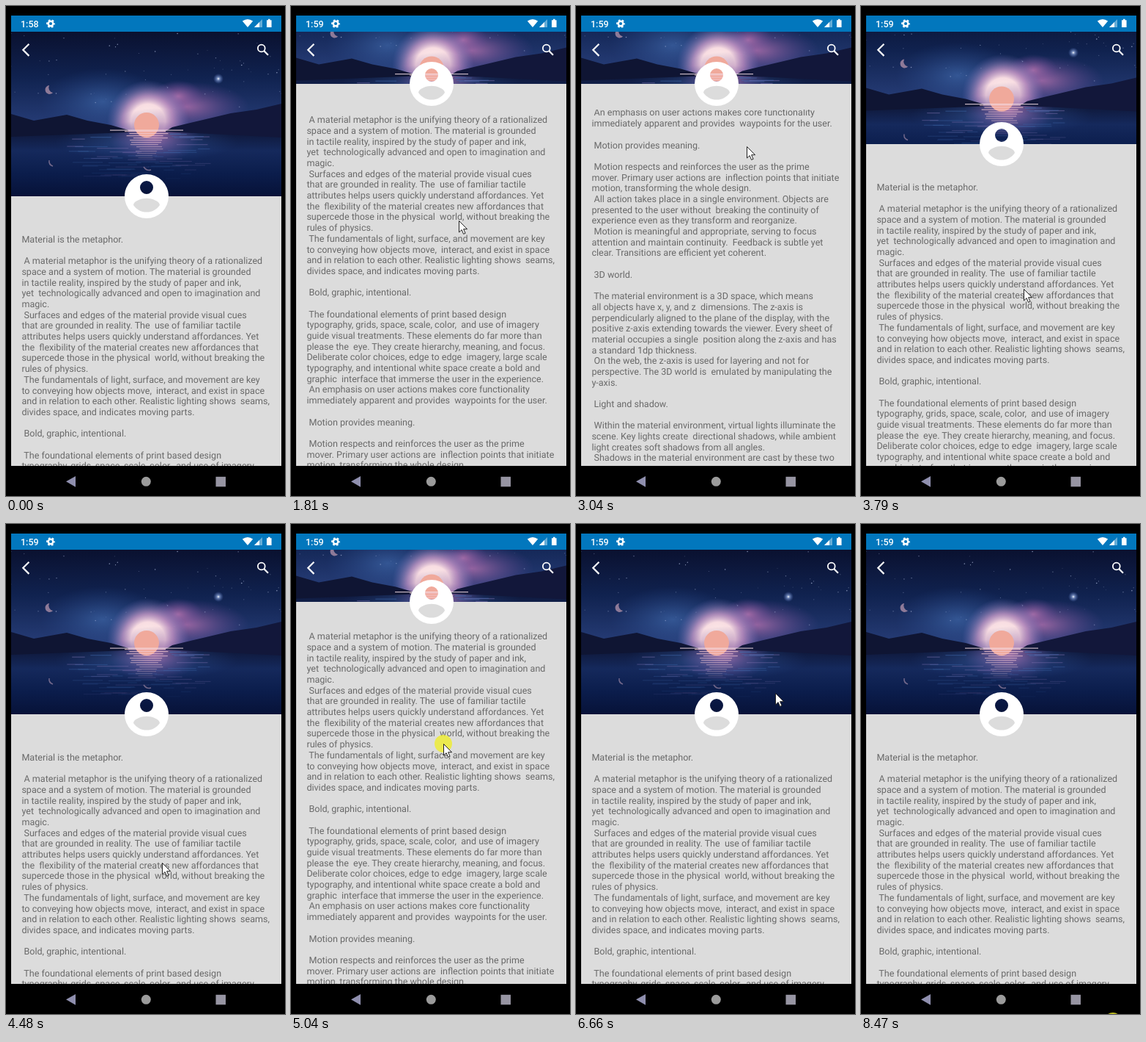
An HTML page that plays this animation: 381x667 px, repeating every 8540 ms.

```html
<!DOCTYPE html>
<html lang="en">
<head>
<meta charset="utf-8">
<title>Collapsing header</title>
<style>
html, body { margin: 0; width: 100%; height: 100%; overflow: hidden; background: #000; }
#stage { position: relative; width: 381px; height: 667px; overflow: hidden; background: #000; }
#stage > * { position: absolute; }
#page { left: 7px; top: 35px; width: 369px; height: 591px; background: #dcdcdc; }
#header { left: 7px; top: 35px; width: 369px; height: 224px; overflow: hidden; }
#scene { display: block; }
#clip { left: 7px; width: 369px; overflow: hidden; }
#copy {
  position: absolute; left: 14.4px; margin: 0; white-space: pre;
  font: 12.557px/14.69px Roboto, sans-serif; color: #696969;
  text-rendering: geometricPrecision;
}
#avatar { left: 155.5px; top: 223px; }
#chrome { left: 0; top: 0; }
#chrome text { font: 500 12.5px Roboto, sans-serif; }
#pointer { left: 0; top: 0; overflow: visible; }
</style>
</head>
<body>
<div id="stage">
  <div id="page"></div>
  <div id="header">
    <svg id="scene" width="369" height="224">
      <defs>
        <linearGradient id="sky" x2="0" y2="1">
          <stop offset="0" stop-color="#0a1130"/>
          <stop offset=".45" stop-color="#10224f"/>
          <stop offset="1" stop-color="#29407c"/>
        </linearGradient>
        <linearGradient id="sea" x2="0" y2="1">
          <stop offset="0" stop-color="#0e1738"/>
          <stop offset=".3" stop-color="#15295c"/>
          <stop offset=".65" stop-color="#0b1d4c"/>
          <stop offset="1" stop-color="#071238"/>
        </linearGradient>
        <radialGradient id="glow">
          <stop offset="0" stop-color="#fff3ec"/>
          <stop offset=".42" stop-color="#f8dde2"/>
          <stop offset=".62" stop-color="#cfa0cc" stop-opacity=".75"/>
          <stop offset="1" stop-color="#6a6cb4" stop-opacity="0"/>
        </radialGradient>
        <radialGradient id="cloud">
          <stop offset="0" stop-color="#b673ae" stop-opacity=".8"/>
          <stop offset="1" stop-color="#6a4a98" stop-opacity="0"/>
        </radialGradient>
        <radialGradient id="haze">
          <stop offset="0" stop-color="#4470b4" stop-opacity=".6"/>
          <stop offset="1" stop-color="#2a4c90" stop-opacity="0"/>
        </radialGradient>
        <radialGradient id="spark">
          <stop offset="0" stop-color="#fff"/>
          <stop offset=".3" stop-color="#a9c2f5" stop-opacity=".6"/>
          <stop offset="1" stop-color="#5f80d0" stop-opacity="0"/>
        </radialGradient>
      </defs>
      <rect width="369" height="136" fill="url(#sky)"/>
      <ellipse cx="125" cy="95" rx="85" ry="45" fill="url(#haze)"/>
      <ellipse cx="240" cy="102" rx="85" ry="34" fill="url(#cloud)"/>
      <ellipse cx="228" cy="88" rx="34" ry="22" fill="url(#cloud)"/>
      <g id="stars" fill="#c9d4f5"></g>
      <circle cx="283" cy="64" r="7" fill="url(#spark)"/>
      <path d="M178 20a8 8 0 0 0 15 10a9 9 0 0 1-15-10z" fill="#dcb9ac"/>
      <path d="M52 73a6 6 0 1 0 5 10a7 7 0 0 1-5-10z" fill="#8e7a98"/>
      <circle cx="187" cy="122" r="56" fill="url(#glow)"/>
      <rect y="135" width="369" height="89" fill="url(#sea)"/>
      <ellipse cx="185" cy="150" rx="125" ry="28" fill="url(#haze)"/>
      <ellipse cx="195" cy="142" rx="62" ry="38" fill="url(#cloud)"/>
      <circle cx="185" cy="127" r="17" fill="#f0a99b"/>
      <path d="M0 112L31 121 76 113 104 121 136 127 160 134 160 137 0 143z" fill="#0f1533"/>
      <path d="M210 136L220 130 262 120 300 111 335 106 369 98V144z" fill="#12173a"/>
      <g id="ripples"></g>
      <g fill="none" stroke="#a58ca8" stroke-opacity=".65" stroke-width="1.5">
        <path d="M52 175q-1 6 5 8M181 184q4 6 10 4"/>
      </g>
    </svg>
  </div>
  <div id="clip"><pre id="copy">Material is the metaphor.

 A material metaphor is the unifying theory of a rationalized
space and a system of motion. The material is grounded
in tactile reality, inspired by the study of paper and ink,
yet  technologically advanced and open to imagination and
magic.
 Surfaces and edges of the material provide visual cues
that are grounded in reality. The  use of familiar tactile
attributes helps users quickly understand affordances. Yet
the  flexibility of the material creates new affordances that
supercede those in the physical  world, without breaking the
rules of physics.
 The fundamentals of light, surface, and movement are key
to conveying how objects move,  interact, and exist in space
and in relation to each other. Realistic lighting shows  seams,
divides space, and indicates moving parts.

 Bold, graphic, intentional.

 The foundational elements of print based design
typography, grids, space, scale, color,  and use of imagery
guide visual treatments. These elements do far more than
please the  eye. They create hierarchy, meaning, and focus.
Deliberate color choices, edge to edge  imagery, large scale
typography, and intentional white space create a bold and
graphic  interface that immerse the user in the experience.
 An emphasis on user actions makes core functionality
immediately apparent and provides  waypoints for the user.

 Motion provides meaning.

 Motion respects and reinforces the user as the prime
mover. Primary user actions are  inflection points that initiate
motion, transforming the whole design.
 All action takes place in a single environment. Objects are
presented to the user without  breaking the continuity of
experience even as they transform and reorganize.
 Motion is meaningful and appropriate, serving to focus
attention and maintain continuity.  Feedback is subtle yet
clear. Transitions are efficient yet coherent.

 3D world.

 The material environment is a 3D space, which means
all objects have x, y, and z  dimensions. The z-axis is
perpendicularly aligned to the plane of the display, with the
positive z-axis extending towards the viewer. Every sheet of
material occupies a single  position along the z-axis and has
a standard 1dp thickness.
 On the web, the z-axis is used for layering and not for
perspective. The 3D world is  emulated by manipulating the
y-axis.

 Light and shadow.

 Within the material environment, virtual lights illuminate the
scene. Key lights create  directional shadows, while ambient
light creates soft shadows from all angles.
 Shadows in the material environment are cast by these two</pre></div>
  <svg id="avatar" width="72" height="72" viewBox="0 0 24 24">
    <path fill="#fff" fill-rule="evenodd" d="M12 2a10 10 0 1 0 0 20a10 10 0 1 0 0-20zM12 5a3 3 0 1 1 0 6a3 3 0 1 1 0-6zM12 19.2c-2.5 0-4.71-1.28-6-3.22.03-1.99 4-3.08 6-3.08 1.99 0 5.97 1.09 6 3.08-1.29 1.94-3.5 3.22-6 3.22z"/>
  </svg>
  <svg id="chrome" width="381" height="667" fill="#fff">
    <rect x="7" y="13" width="369" height="22" fill="#0277bd"/>
    <text id="clock" x="20" y="28.5">1:58</text>
    <g fill="none" stroke="#fff">
      <circle cx="61" cy="24" r="3.3" stroke-width="2.5"/>
      <circle cx="61" cy="24" r="5" stroke-width="1.8" stroke-dasharray="2.6 2.636" stroke-dashoffset="1.3"/>
    </g>
    <path d="M322.8 20.5Q330 15.5 337.2 20.5L330 29z"/>
    <path d="M350 18V29H339z" opacity=".4"/>
    <path d="M346 22V29H339z"/>
    <path d="M356 19.2h2v-1.4h2.6v1.4h2V29h-6.6z"/>
    <g fill="none" stroke="#fff" stroke-width="2.2">
      <path d="M31.4 51.7L23.3 59.8 31.4 67.9"/>
      <circle cx="348.8" cy="57.5" r="4.9" stroke-width="1.8"/>
      <path d="M352.5 61.2L358 66.7"/>
    </g>
    <path d="M82 647.3L95 640V654.7z" fill="#8f8fae"/>
    <circle cx="191.3" cy="647.3" r="6.5" fill="#9b9b9b"/>
    <rect x="286.5" y="640.8" width="13.5" height="13.5" fill="#9795a3"/>
  </svg>
  <svg id="pointer" width="1" height="1">
    <circle id="press" r="12" fill="#f0ee28" fill-opacity=".78"/>
    <path d="M.5.5V16l3.6-3.4 2.5 5.8 2.5-1.1-2.5-5.6h5z" fill="#fff" stroke="#222"/>
  </svg>
</div>
<script>
const LOOP = 8540, STEP = 67, COLLAPSE = 153;
const $ = id => document.getElementById(id);

// Stars and water ripples from a seeded generator
let seed = 11;
const rnd = () => (seed = seed * 16807 % 2147483647) / 2147483647;
const repeat = (n, make) => Array.from({ length: n }, (_, i) => make(i)).join('');
const ripple = (y, w, spread, color, alpha) =>
  `<rect x="${185 - w / 2 + (rnd() - .5) * spread}" y="${y}" width="${w}" height="1.2" fill="${color}" opacity="${alpha}"/>`;

$('stars').innerHTML = repeat(60, () =>
  `<circle cx="${rnd() * 369}" cy="${rnd() * 105}" r="${.35 + rnd() * .5}" opacity="${.2 + rnd() * .5}"/>`);
$('ripples').innerHTML =
  repeat(60, () => {
    const depth = rnd();
    return ripple(138 + depth * 62, 12 + rnd() * 34, 230 - 100 * depth,
      rnd() < .4 ? '#8b79b8' : '#4470b4', .4 * (1 - depth) + .06);
  }) +
  repeat(13, i => ripple(135 + i * 3, 56 - i * 3, 14, '#f3c9d2', .8 - i * .055)) +
  ripple(133.5, 100, 0, '#f6dfe6', .8);

const easeIn = p => p * p;
const easeOut = p => p * (2 - p);
const linear = p => p;

// Each gesture carries the pointer and the page to new places
const gestures = [
  { from: 63, to: 930, x: 232, y: 487, scroll: 0, ease: easeOut },
  { from: 930, to: 1810, x: 229, y: 292, scroll: 192, ease: easeIn },
  { from: 1810, to: 2370, x: 233, y: 191, scroll: 569, ease: easeOut },
  { from: 3050, to: 4190, x: 221, y: 413, scroll: 0, ease: easeOut },
  { from: 4210, to: 4480, x: 213, y: 461, scroll: 0, ease: linear },
  { from: 4550, to: 5600, x: 206, y: 227, scroll: 279, ease: easeOut },
  { from: 5790, to: 6340, x: 216, y: 410, scroll: 0, ease: easeOut },
  { from: 6340, to: 7010, x: 355, y: -40, scroll: 0, ease: linear },
  { from: 7540, to: 7800, x: 320, y: 700, scroll: 0, ease: easeOut },
  { from: 8460, to: 8470, x: 344, y: 677, scroll: 0, ease: linear }
];
const presses = [[1000, 1745], [3110, 3600], [4620, 5250], [5720, 6150], [8400, LOOP]];

function poseAt(time) {
  const pose = { x: 330, y: 690, scroll: 0 };
  for (const g of gestures) {
    if (time < g.from) break;
    const held = Math.floor((time - g.from) / STEP) * STEP;
    const p = time >= g.to ? 1 : g.ease(held / (g.to - g.from));
    for (const key in pose) pose[key] = Math.round(pose[key] + (g[key] - pose[key]) * p);
  }
  return pose;
}

function draw(time) {
  const { x, y, scroll } = poseAt(time);
  const shift = Math.min(scroll, COLLAPSE);
  const top = 294 - shift;
  $('header').style.height = 224 - shift + 'px';
  $('scene').style.transform = `translateY(${-shift / 2}px)`;
  $('avatar').style.transform = `translateY(${-shift}px)`;
  $('clip').style.top = top + 'px';
  $('clip').style.height = 626 - top + 'px';
  $('copy').style.top = 17.9 + shift - scroll + 'px';

  $('clock').textContent = time < 530 ? '1:58' : '1:59';
  $('pointer').style.transform = `translate(${x}px, ${y}px)`;
  const down = presses.some(([a, b]) => time >= a && time < b);
  $('press').style.display = down ? '' : 'none';
}

const start = performance.now();
function frame() {
  draw((performance.now() - start) % LOOP);
  requestAnimationFrame(frame);
}
frame();
</script>
</body>
</html>
```
